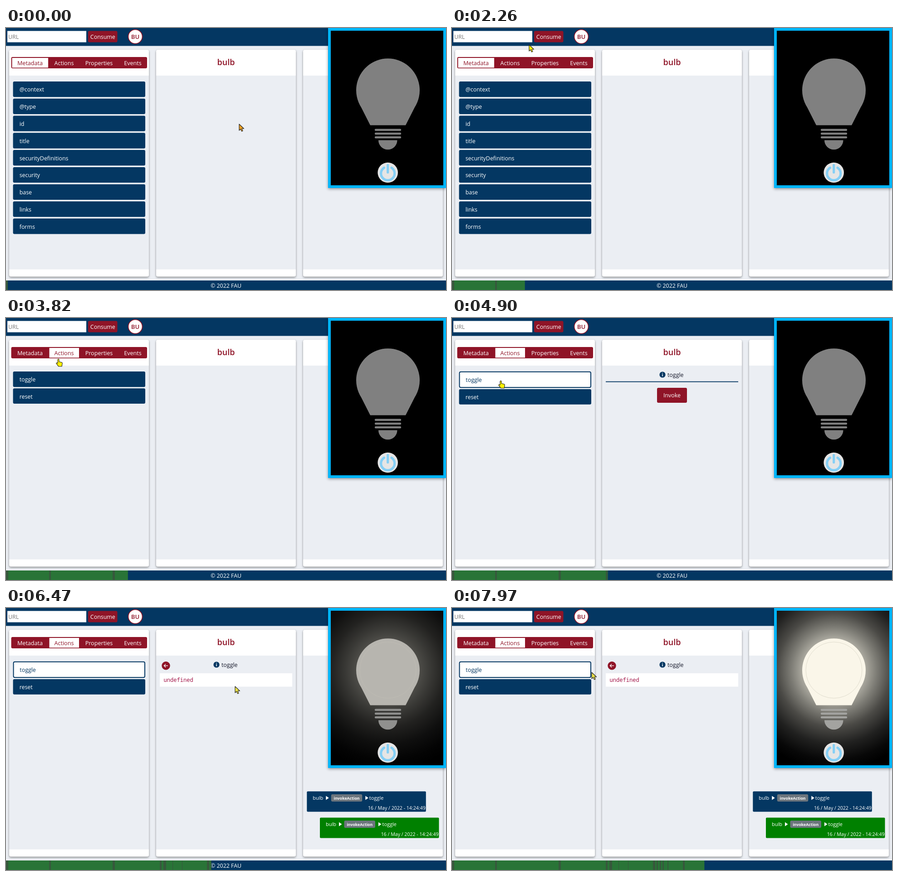
An HTML page for the animation above (8 s loop, 970 by 578 pixels).

```html
<!DOCTYPE html>
<html lang="en">
<head>
<meta charset="utf-8">
<title>Bulb console</title>
<style>
  html, body { margin: 0; width: 100%; height: 100%; overflow: hidden; background: #ebeef3; }
  svg { display: block; font: 12.4px 'Open Sans', 'Noto Sans', sans-serif; }
  .navy { fill: #043762; }
  .red { fill: #8f1427; }
  .white { fill: #fff; }
  .mid { text-anchor: middle; }
  .card { filter: drop-shadow(0 2px 2px rgba(0,0,0,.42)); }
  .outline { fill: #fff; stroke: #043762; stroke-width: 2; }
</style>
</head>
<body>
<svg width="970" height="578" viewBox="0 0 970 578">
  <defs>
    <radialGradient id="glow" gradientUnits="userSpaceOnUse" cx="842" cy="137" r="220">
      <stop offset=".3" stop-color="#b0aea4"/>
      <stop offset=".43" stop-color="#7d7c75"/>
      <stop offset=".57" stop-color="#4b4a46"/>
      <stop offset=".74" stop-color="#212120"/>
      <stop offset=".9" stop-color="#080808"/>
      <stop offset="1" stop-color="#000"/>
    </radialGradient>
    <clipPath id="done"><rect id="doneWidth" y="557" height="21"/></clipPath>
  </defs>
  <rect width="970" height="578" fill="#ebeef3"/>
  <rect class="navy" width="970" height="39.5"/>
  <rect class="white" x="3" y="6.5" width="174" height="25"/>
  <text x="5" y="24" fill="#757575">URL</text>
  <rect class="red" x="181" y="6.5" width="64.5" height="25" rx="3"/>
  <text class="white mid" x="213.3" y="24">Consume</text>
  <circle class="white" cx="285" cy="19" r="15.5" stroke="#8f1427" stroke-width="1.6"/>
  <text class="red mid" x="285" y="23.8" font-size="13.2" font-weight="600">BU</text>

  <g id="cards"></g>
  <text class="red mid" x="485" y="82" font-size="18" font-weight="600">bulb</text>
  <g id="tabs"></g>
  <g id="metadata"></g>
  <g id="actions"></g>
  <g id="selected"></g>

  <g id="heading">
    <circle class="navy" cx="464" cy="125" r="6.6"/>
    <path d="M464 124v4.5M464 121v1.6" stroke="#fff" stroke-width="1.6"/>
    <text x="475" y="130" fill="#15182a">toggle</text>
  </g>
  <g id="invoke">
    <rect class="navy" x="339" y="139.7" width="292" height="1.8"/>
    <rect class="red" x="452" y="154" width="66" height="33" rx="3"/>
    <text class="white mid" x="485" y="175">Invoke</text>
  </g>
  <g id="result">
    <circle class="red" cx="352.5" cy="127.3" r="9.2"/>
    <path d="M357 127.3h-8.5m3.6-3.7l-3.7 3.7 3.7 3.7" fill="none" stroke="#fff" stroke-width="1.3"/>
    <rect class="white" x="339" y="144" width="292" height="29.5"/>
    <text x="347.5" y="163" fill="#a3174a" font-size="12.1" font-family="'Noto Sans Mono', monospace">undefined</text>
    <g id="log"></g>
  </g>

  <rect x="710" width="260" height="353" fill="#00b4fb" style="filter:drop-shadow(0 2px 3px rgba(0,0,0,.4))"/>
  <rect x="716" y="6" width="248" height="341"/>
  <rect id="light" x="716" y="6" width="248" height="341" fill="url(#glow)"/>
  <path id="glass" d="M803 214.5L783 175A70 70 0 1 1 901 175L881 214.5Z"/>
  <circle id="rim" cx="842" cy="137" r="62" fill="none" stroke="#cfccbc" stroke-width=".8"/>
  <g id="socket">
    <path d="M815 224.8h54M815 233h54M815 241.2h54" stroke-width="4.4" stroke-linecap="round"/>
    <path d="M821 247.5h41.5a20.7 20.7 0 0 1-41.5 0z" stroke="none"/>
  </g>
  <circle cx="841.7" cy="319" r="22.3" fill="#e5e5e5"/>
  <path d="M833.5 308.3a15 15 0 1 0 16.4 0M841.7 302.5v16" fill="none" stroke="#85cff5" stroke-width="5.2" stroke-linecap="round"/>

  <rect class="navy" y="557" width="970" height="21"/>
  <text class="white mid" x="485" y="573">© 2022 FAU</text>
  <g id="progress" clip-path="url(#done)"></g>
  <path id="cursor" stroke="#222" stroke-width="1.1" stroke-linejoin="round"/>
</svg>
<script>
const LOOP = 8000;
const TAB_CLICK = 3500, TOGGLE_CLICK = 4500, INVOKE_CLICK = 6130;
const $ = id => document.getElementById(id);
const rect = (x, y, w, h, attrs) => `<rect x="${x}" y="${y}" width="${w}" height="${h}" ${attrs}/>`;
const text = (x, y, label, attrs = 'class="white"') => `<text x="${x}" y="${y}" ${attrs}>${label}</text>`;
const item = (label, y, h = 34.3) =>
  rect(15.5, y, 291.5, h, 'rx="3" class="navy"') + text(29.7, y + 22.4, label);

$('cards').innerHTML = [7, 331, 655].map(x =>
  rect(x, 48, 308, 500.5, 'rx="4" class="white card"') + rect(x, 105, 308, 427.5, 'fill="#ebeef3"')).join('');

$('metadata').innerHTML = ['@context', '@type', 'id', 'title', 'securityDefinitions', 'security', 'base', 'links', 'forms']
  .map((label, i) => item(label, 118 + i * 37.78)).join('');
$('actions').innerHTML = item('toggle', 118) + item('reset', 155.3, 33.7);
$('selected').innerHTML = rect(16.5, 118.8, 289.5, 34.4, 'rx="3" class="outline"')
  + text(30.3, 141.4, 'toggle', 'class="navy"') + item('reset', 157, 33.7);

const tabs = [['Metadata', 12, 94], ['Actions', 94, 162], ['Properties', 162, 248], ['Events', 248, 311]];
function drawTabs(active) {
  $('tabs').innerHTML = rect(11.5, 64, 299.5, 25, 'rx="3" class="red"') + tabs.map(([label, left, right], i) => {
    const on = i === active;
    return (on ? rect(left + 1.5, 66, right - left - 2.5, 21.5, 'class="white"') : '')
      + text((left + right) / 2, 82, label, `class="mid ${on ? 'red' : 'white'}" font-size="12.6"`);
  }).join('');
}

const entry = (x, y, color) => `<g transform="translate(${x} ${y})" font-size="11">`
  + rect(0, 0, 262.5, 45, `rx="2" fill="${color}"`)
  + text(13, 18.3, 'bulb') + text(137.5, 18.3, 'toggle')
  + '<path class="white" d="M42 10l6.5 4.5-6.5 4.5zM129 10l6.5 4.5-6.5 4.5z"/>'
  + rect(53.5, 6.5, 68.5, 16, 'rx="3" fill="#6c757d"')
  + text(87.7, 18, 'invokeAction', 'class="white mid" font-size="8.7" font-weight="700"')
  + text(261.5, 40, '16 / May / 2022 - 14:24:49', 'class="white" text-anchor="end" font-size="10.6"') + '</g>';
$('log').innerHTML = entry(663.3, 404.5, '#043762') + entry(692, 462.5, '#008000');

// Darker seams in the green bar, as [left, width].
const seams = [[0, 5], [95, 4], [235, 5], [339, 4], [347, 6], [367, 1], [388, 1],
  [443, 5], [451, 3], [458, 3], [464, 3], [475, 2], [509, 4]];
$('progress').innerHTML = rect(0, 557, 600, 21, 'fill="#297437"')
  + seams.map(([x, w]) => rect(x, 557, w, 21, 'fill="#36583c"')).join('');

const track = [[0, 514, 212], [900, 514, 212], [1370, 464, 203], [1650, 306, 136], [2080, 168, 57],
  [2260, 170, 37], [2500, 153, 33], [2900, 128, 52], [3300, 118, 80], [3500, 116, 90], [3900, 116, 90],
  [4160, 104, 124], [4500, 100, 138], [5000, 110, 138], [5450, 515, 168], [5650, 500, 163],
  [6100, 500, 163], [6300, 505, 173], [7490, 505, 173], [7970, 308, 142], [LOOP, 308, 142]];
const ARROW = 'M0 0V14L3.2 11 5.6 16 8 15 5.8 10H10.5Z';
const HAND = 'M-2 1.5q1.5-2 3 0v5l5.5 1.2q2 .6 1.6 3l-1 6h-7.5l-4.8-6.5q0-2 2-1.3l1.2 1z';

const clamp = v => Math.max(0, Math.min(1, v));
const mix = (a, b, k) => a + (b - a) * k;
const blend = (from, to, k) => `rgb(${from.map((v, i) => Math.round(mix(v, to[i], k)))})`;
const show = (id, on) => $(id).style.display = on ? '' : 'none';
const GREY = [128, 128, 128];
let activeTab = -1;

function drawCursor(t) {
  const next = Math.max(1, track.findIndex(p => p[0] > t));
  const [a, b] = [track[next - 1], track[next]];
  const k = (t - a[0]) / (b[0] - a[0]);
  const hand = t > 3050 && t < 5170 || t > 5385 && t < INVOKE_CLICK;
  const cursor = $('cursor');
  cursor.setAttribute('d', hand ? HAND : ARROW);
  cursor.setAttribute('transform', `translate(${mix(a[1], b[1], k)} ${mix(a[2], b[2], k)})`);
  cursor.setAttribute('fill', t < 900 ? '#eda022' : t < INVOKE_CLICK ? '#fff200' : '#ebe247');
}

function frame() {
  const t = performance.now() % LOOP;
  const tab = t < TAB_CLICK ? 0 : 1;
  if (tab !== activeTab) drawTabs(activeTab = tab);
  show('metadata', t < TAB_CLICK);
  show('actions', t >= TAB_CLICK && t < TOGGLE_CLICK);
  show('selected', t >= TOGGLE_CLICK);
  show('heading', t >= TOGGLE_CLICK);
  show('invoke', t >= TOGGLE_CLICK && t < INVOKE_CLICK);
  show('result', t >= INVOKE_CLICK);

  const lit = clamp((t - 6200) / 600);
  $('light').setAttribute('opacity', lit);
  $('rim').setAttribute('opacity', lit * .8);
  $('glass').setAttribute('fill', blend(GREY, [250, 246, 233], lit));
  const metal = blend(GREY, [163, 163, 160], lit);
  $('socket').setAttribute('fill', metal);
  $('socket').setAttribute('stroke', metal);

  $('doneWidth').setAttribute('width', 4 + t * .0693);
  drawCursor(t);
  requestAnimationFrame(frame);
}
frame();
</script>
</body>
</html>
```
